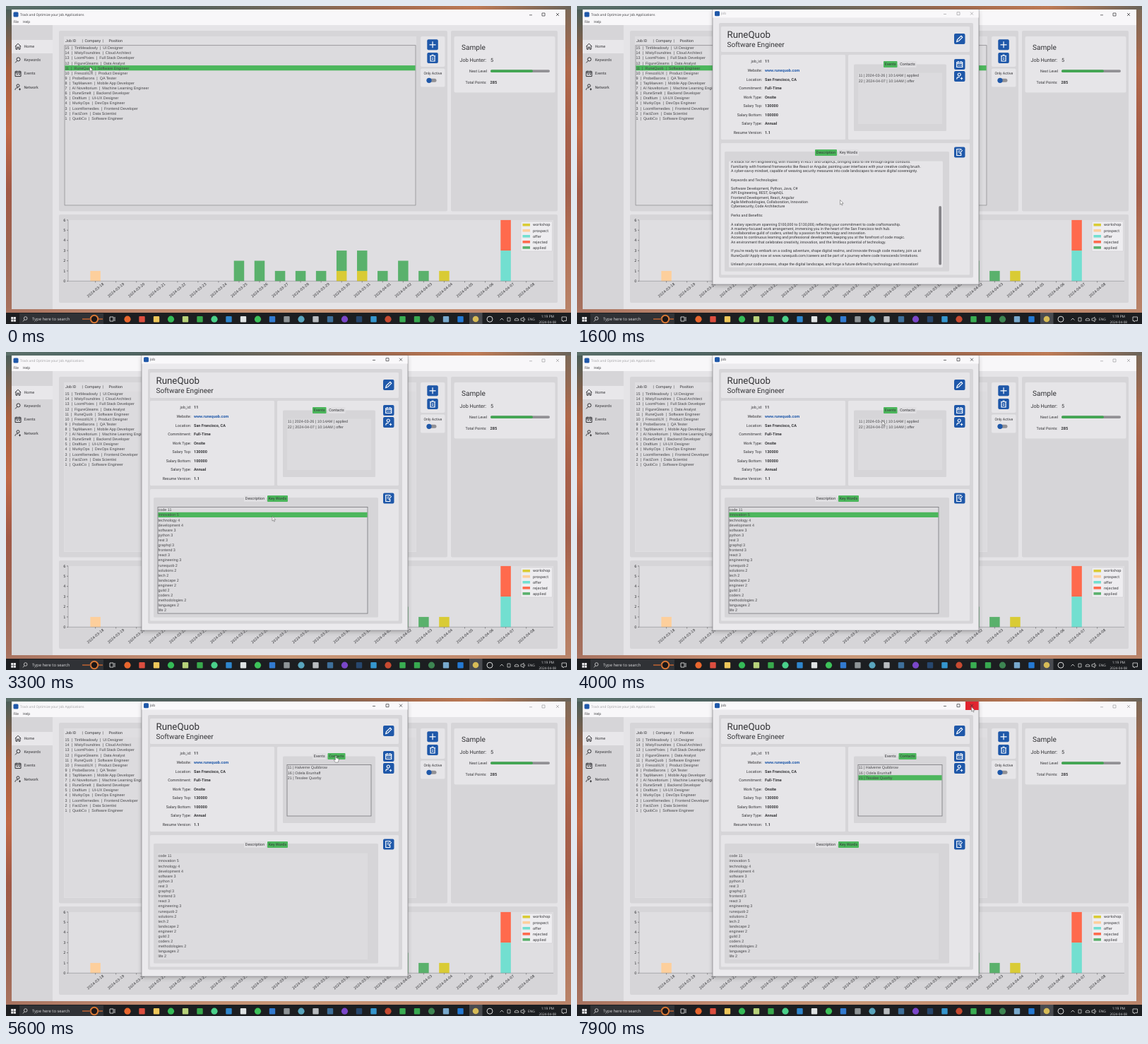
An HTML page for the animation above (8 s loop, 800 by 450 pixels).

```html
<!DOCTYPE html>
<html lang="en">
<head>
<meta charset="utf-8">
<title>Job tracker</title>
<style>
html, body { margin: 0; width: 100%; height: 100%; overflow: hidden; background: #222; }
svg { display: block; width: 800px; height: 450px; }
text { white-space: pre; text-rendering: geometricPrecision; }
.ui { font-family: Roboto, sans-serif; }
.list { font-family: "Liberation Sans", Arial, sans-serif; fill: #47474a; }
.sys { font-family: "Open Sans", sans-serif; }
.plot { font-family: "DejaVu Sans", sans-serif; }
.light { fill: #dcdcde; }
</style>
</head>
<body>
<svg id="stage" viewBox="0 0 800 450" xmlns="http://www.w3.org/2000/svg"></svg>
<script>
const BASE = '#e5e4e7', PANEL = '#d6d5d8', LIST = '#dcdbde', CARD = '#e6e5e8';
const GREEN = '#4cb65c', BLUE = '#1f58a9', INK = '#333336', ROW = 7.11;
const LOOP = 8000, STEP = 100, SCROLL = 111.3;

const rect = (x, y, w, h, fill, extra = '') =>
  `<rect x="${x}" y="${y}" width="${w}" height="${h}" fill="${fill}" ${extra}/>`;
const path = (d, stroke = INK, width = 0.7, extra = '') =>
  `<path d="${d}" fill="none" stroke="${stroke}" stroke-width="${width}" ${extra}/>`;
const circle = (x, y, r, fill, extra = '') =>
  `<circle cx="${x}" cy="${y}" r="${r}" fill="${fill}" ${extra}/>`;
// y is the vertical middle of the text
const text = (x, y, str, size = 5.4, cls = 'ui', extra = '') =>
  `<text x="${x}" y="${y + size * 0.35}" font-size="${size}" class="${cls}" fill="${INK}" ${extra}>${str}</text>`;
const END = 'text-anchor="end"', MID = 'text-anchor="middle"', BOLD = 'font-weight="700"';
const rows = (x, y, lines) => lines.map((s, i) => text(x, y + i * ROW, s, 5.4, 'list')).join('');
const group = (id, body, extra = '') => `<g id="${id}" ${extra}>${body}</g>`;

const jobs = [
  'TintMeadowly|UI Designer', 'MistyFoundries|Cloud Architect', 'LoomPixies|Full Stack Developer',
  'FigureGleams|Data Analyst', 'RuneQuob|Software Engineer', 'FrescoliUX|Product Designer',
  'ProbeBarons|QA Tester', 'TapMaeven|Mobile App Developer', 'AI Noveltorium|Machine Learning Engineer',
  'RuneSmelt|Backend Developer', 'Draftlum|UI-UX Designer', 'MurkyOps|DevOps Engineer',
  'LoomRemedies|Frontend Developer', 'FactZorn|Data Scientist', 'QuobCo|Software Engineer'
].map((job, i) => `${15 - i}|${job}`.replace(/\|/g, '  |  '));

const keywords = ('code 11,innovation 5,technology 4,development 4,software 3,python 3,rest 3,graphql 3,' +
  'frontend 3,react 3,engineering 3,runequob 2,solutions 2,tech 2,landscape 2,engineer 2,guild 2,' +
  'coders 2,methodologies 2,languages 2,life 2').split(',');
const events = ['11 | 2024-03-26 | 10:14AM | applied', '22 | 2024-04-07 | 10:14AM | offer'];
const contacts = ['11 | Halverne Quibbrow', '16 | Odela Brunhaff', '21 | Tesslee Quorby'];

const description = `About Us:
At RuneQuob, we forge digital solutions that empower businesses and individuals to thrive in the ever-evolving tech
landscape. We're searching for a skilled Software Engineer to join our guild of coders, where innovation, code, and
technology intertwine.

Responsibilities:

Collaborate with a consortium of developers to design, develop, and deploy software solutions using agile methodologies.
Code in languages like Python, Java, or C#, utilizing your skills to breathe life into intricate digital structures.
Engineer robust APIs and backend systems, weaving data into seamless interactions through REST and GraphQL.
Dive into frontend development, creating responsive user interfaces with technologies such as React or Angular.
Incorporate security measures into code structures, fortifying digital fortresses against cyber threats.

Qualifications:

A degree in Computer Science, Engineering, or a related field, bolstering your foundation in the realms of code.
Proficiency in languages like Python, Java, C#, and the ability to orchestrate code symphonies that resonate.
A knack for API engineering, with mastery in REST and GraphQL, bringing data to life through digital conduits.
Familiarity with frontend frameworks like React or Angular, painting user interfaces with your creative coding brush.
A cyber-savvy mindset, capable of weaving security measures into code landscapes to ensure digital sovereignty.

Keywords and Technologies:

Software Development, Python, Java, C#
API Engineering, REST, GraphQL
Frontend Development, React, Angular
Agile Methodologies, Collaboration, Innovation
Cybersecurity, Code Architecture

Perks and Benefits:

A salary spectrum spanning $100,000 to $130,000, reflecting your commitment to code craftsmanship.
A mastery-focused work arrangement, immersing you in the heart of the San Francisco tech hub.
A collaborative guild of coders, united by a passion for technology and innovation.
Access to continuous learning and professional development, keeping you at the forefront of code magic.
An environment that celebrates creativity, innovation, and the limitless potential of technology.

If you're ready to embark on a coding adventure, shape digital realms, and innovate through code mastery, join us at
RuneQuob! Apply now at www.runequob.com/careers and be part of a journey where code transcends limitations.

Unleash your code prowess, shape the digital landscape, and forge a future defined by technology and innovation!`.split('\n');

const gradient = (id, dir, stops) => `<linearGradient id="${id}" ${dir}>${
  stops.map((c, i) => `<stop offset="${i / (stops.length - 1)}" stop-color="${c}"/>`).join('')}</linearGradient>`;

function wallpaper() {
  const down = 'x1="0" y1="0" x2="0" y2="1"';
  return `<defs>
    ${gradient('top', '', ['#5b6f69', '#4d6664', '#55625d', '#75695a', '#a2694d', '#bd7a55', '#6a645a'])}
    ${gradient('left', down, ['#4a5d58', '#a9603f', '#c06a48', '#a05a48', '#9c6552', '#a87360'])}
    ${gradient('right', down, ['#7d6a58', '#b0684a', '#a85f49', '#a4604c', '#b57558', '#b9846a'])}
    ${gradient('bottom', '', ['#a87360', '#c08a70', '#c99878', '#c48d70', '#b9846a'])}
    <clipPath id="descClip"><rect x="215" y="219.5" width="297" height="150"/></clipPath>
    <filter id="shadow" x="-10%" y="-10%" width="120%" height="120%"><feGaussianBlur stdDeviation="3"/></filter>
  </defs>` + rect(0, 0, 800, 6, 'url(#top)') + rect(0, 5, 9, 430, 'url(#left)') +
    rect(791, 5, 9, 430, 'url(#right)') + rect(0, 428, 800, 7, 'url(#bottom)');
}

// Minimise, maximise and close marks
const controls = (xs, y) => path(`M${xs[0] - 2} ${y + .8}h4`) + path(`M${xs[1] - 2} ${y - 2}h4v4h-4z`) +
  path(`M${xs[2] - 2} ${y - 2}l4 4m0-4l-4 4`);

const button = (x, y, glyph) => rect(x, y, 15.5, 15, BLUE, 'rx="2"') +
  `<g transform="translate(${x + 7.75} ${y + 7.5})">${path(glyph, '#fff', 1.2)}</g>`;

function sidebar() {
  const glyphs = ['M-4 0L0-4L4 0M-3-1V4H-1V1H1V4H3V-1', 'M-1 1L-4 4M3-1A2.4 2.4 0 1 1-2-1A2.4 2.4 0 1 1 3-1',
    'M-4-3H4V4H-4ZM-4-1H4M-2-4V-2M2-4V-2M-2 1H0M1 1H3', 'M2-2A2 2 0 1 1-2-2A2 2 0 1 1 2-2M-4 4C-4 1-2 1 0 1M1 3H4M2.5 1.5V4.5'];
  return rect(8, 27, 58, 402, PANEL) + rect(8, 48, 58, 19, '#e8e7ea') +
    ['Home', 'Keywords', 'Events', 'Network'].map((name, i) => {
      const y = 57.2 + i * 19.2;
      return `<g transform="translate(17 ${y})">${path(glyphs[i], INK, 1)}</g>` + text(25.5, y, name);
    }).join('');
}

function chart() {
  const unit = 14.4, floor = 389.3, colors = { w: '#d9cb35', p: '#fdcf9c', o: '#72dfd0', r: '#ff6a4d', a: '#5ab16c' };
  const bars = { 0: 'p', 7: 'aa', 8: 'aa', 9: 'a', 10: 'a', 11: 'a', 12: 'waa', 13: 'waa', 14: 'a', 15: 'aa', 16: 'a', 17: 'w', 20: 'ooorrr' };
  let out = rect(75, 295, 706, 125, PANEL, 'rx="2"') + rect(88, 303, 687, 86.3, '#dfdee1');
  for (let v = 0; v <= 6; v++) {
    const y = floor - v * unit;
    out += text(84.5, y, v, 5, 'plot', END) + path(`M86 ${y}h2`, INK, .5);
  }
  for (let i = 0; i < 22; i++) {
    const x = 126.6 + i * 29.05;
    const date = i < 14 ? `2024-03-${18 + i}` : `2024-04-0${i - 13}`;
    const units = bars[i] || '';
    [...new Set(units)].forEach(kind => {
      const count = units.split(kind).length - 1;
      out += rect(x - 7.25, floor - (units.indexOf(kind) + count) * unit, 14.5, count * unit, colors[kind]);
    });
    out += path(`M${x} ${floor}v2`, INK, .5) +
      text(0, 0, date, 5, 'plot', `${MID} transform="translate(${x} 402) rotate(-40)"`);
  }
  out += path('M88 303V389.3H775', '#77767a', .5) +
    rect(729, 305, 44.5, 42, '#eeedf0', 'rx="1" stroke="#c8c7ca" stroke-width=".5"');
  ['workshop', 'prospect', 'offer', 'rejected', 'applied'].forEach((name, i) => {
    const y = 309.7 + i * 8.05;
    out += rect(731.5, y - 1.8, 10.5, 3.6, colors[name[0]]) + text(746, y, name, 5.1, 'plot');
  });
  return out;
}

function mainWindow() {
  return rect(8, 5, 784, 424, BASE) + rect(8, 5, 784, 22, '#f8f7f9') + rect(10.5, 8.5, 7, 7, BLUE, 'rx="1.5"') +
    group('mainTitle', text(20, 12, 'Track and Optimize your Job Applications', 4.75, 'sys') + controls([743, 761, 781], 12)) +
    text(10.5, 22.3, 'File', 4.75, 'sys') + text(24, 22.3, 'Help', 4.75, 'sys') + sidebar() +
    rect(75, 35, 550, 255.5, PANEL, 'rx="2"') + rect(82, 43, 499, 240, '#dfdee1') +
    [[84, 'Job ID'], [107.5, '|'], [111.5, 'Company'], [136.5, '|'], [145.5, 'Position']]
      .map(([x, s]) => text(x, 49, s, 5.35)).join('') +
    rect(83, 55.7, 497, 226.3, LIST) + rect(83, 55.7, 497, 226.3, 'none', 'id="jobsBorder" stroke="#8a898d" stroke-width=".8"') +
    rect(83.4, 84.1, 496.2, 7.2, GREEN, 'id="jobPick"') + rows(83.5, 59.3, jobs) +
    rect(587, 43, 34.5, 43, CARD, 'rx="2"') + button(596.3, 47.3, 'M0-4.5V4.5M-4.5 0H4.5') +
    button(596.3, 66, 'M-3-3H3V4.5H-3ZM-4-3H4M-1.5-4.5H1.5M-1 0H1M-1 2H1') +
    rect(587, 88.5, 34.5, 26, CARD, 'rx="2"') + text(604.3, 95, 'Only Active', 5.2, 'ui', MID) +
    rect(596, 102.8, 13.5, 5, '#929195', 'rx="2.5"') + circle(599, 105.3, 3.6, BLUE) +
    rect(630, 35, 151, 255.5, PANEL, 'rx="2"') + rect(634.5, 43, 143, 79.5, CARD, 'rx="2"') +
    text(645, 58.3, 'Sample', 10.1) + text(642.5, 76, 'Job Hunter:', 7.25) + text(686, 76, '5', 7.25) +
    text(681, 92, 'Next Level', 5.4, 'ui', END) + rect(686, 90.2, 84, 3.8, '#929195', 'rx="1.9"') +
    rect(686, 90.2, 60, 3.8, '#43a653', 'rx="1.9"') + text(680.5, 107.7, 'Total Points:', 5.4, 'ui', END) +
    text(685.5, 107.7, '285', 5.6, 'ui', BOLD) + chart();
}

function taskbar() {
  let out = rect(0, 434, 800, 16, '#1c1e21') + rect(19, 435, 119, 15, '#303236');
  for (const [x, y] of [[8, 440], [11.6, 440], [8, 443.6], [11.6, 443.6]]) out += rect(x - .8, y, 3.1, 3.1, '#e8e8ea');
  out += path('M30 442a2.3 2.3 0 1 1-4.6 0a2.3 2.3 0 1 1 4.6 0M26 444l-2 2.4', '#ddd', .8) +
    text(37, 443.3, 'Type here to search', 5.85, 'sys light') +
    circle(125, 443, 5.2, '#1d1717', 'stroke="#d87735" stroke-width="2"') + rect(108, 442, 12, 2, '#9a5632') +
    rect(131, 442, 6, 2, '#9a5632') + path('M147 440h5v6h-5zM154 440v6', '#ddd', .9);
  const icons = ['#e8662e', '#dc4e3f', '#edc65a', '#35bb57', '#b7d27a', '#38a94c', '#4ad08a', '#2f86cd', '#dfe3e4',
    '#3dc25a', '#327ad0', '#8e9497', '#59a5bd', '#b8bcc0', '#3e6f9a', '#7a47c9', '#27476e', '#3596ce', '#c74a31',
    '#39ad52', '#37a950', '#3d8552', '#78a9cd', '#2579d3'];
  icons.forEach((c, i) => {
    const x = 172 + i * 20.5;
    out += i % 3 ? rect(x - 4.2, 439, 8.4, 8.4, c, 'rx="1"') : circle(x, 443.2, 4.6, c);
  });
  return out + rect(656, 434, 18.5, 16, '#494b50') + circle(665, 443, 4.3, '#d6bb57') +
    circle(685, 443.2, 4, 'none', 'stroke="#ddd" stroke-width="1"') + path('M699.5 444.5l2.5-2.5l2.5 2.5', '#ddd', .8) +
    path('M710 441h4v5h-4zM720 445q0-3 3-3q3 0 3 3zM729 442h2l2-2v7l-2-2h-2zM734 442q1.5 1.5 0 3', '#ccc', .8) +
    text(739, 443.3, 'ENG', 4.8, 'sys light') +
    text(776, 439.7, '1:19 PM', 4.9, 'sys light', END) +
    text(779, 447, '2024-04-08', 4.7, 'sys light', END) +
    path('M787 440h6.5v5.5h-3l-1.5 1.5v-1.5h-2z', '#ddd', .8);
}

const tabs = [
  { id: 'events', label: 'Events', x: 434, y: 78, w: 19.5 }, { id: 'contacts', label: 'Contacts', x: 455.5, y: 78, w: 25 },
  { id: 'desc', label: 'Description', x: 337, y: 203, w: 31 }, { id: 'keys', label: 'Key Words', x: 370, y: 203, w: 29 }
];

function popup() {
  const details = [['job_id', '11'], ['Website', 'www.runequob.com'], ['Location', 'San Francisco, CA'],
    ['Commitment', 'Full-Time'], ['Work Type', 'Onsite'], ['Salary Top', '130000'], ['Salary Bottom', '100000'],
    ['Salary Type', 'Annual'], ['Resume Version', '1.1']];
  const cards = [[204, 29, 352, 36], [204, 69, 176, 120], [384, 69, 172, 120], [204, 194, 352, 186.5]];
  const person = 'M1.5-2.5A2 2 0 1 1-2.5-2.5A2 2 0 1 1 1.5-2.5M-4 4C-4 1-2 1 0 1M1 3H4.5M2.8 1.2V4.8';
  const body = rect(201, 24, 360, 360.5, PANEL, 'rx="2"') + cards.map(c => rect(...c, CARD, 'rx="1.5"')).join('') +
    text(212.5, 40.5, 'RuneQuob', 13.3) + text(212.5, 54.7, 'Software Engineer', 10) +
    details.map(([key, value], i) => text(262, 78.5 + i * 12.56, key + ':', 5.4, 'ui', END) +
      text(266, 78.5 + i * 12.56, value, 5.5, 'ui', BOLD + (i === 1 ? ` style="fill:${BLUE}"` : ''))).join('') +
    button(534, 39, 'M-4 4L-3.2 1L2.2-4.2L4-2.2L-1.2 3Z') +
    button(534, 75, 'M-4-3H4V4H-4ZM-4-1H4M-2-4.5V-2M2-4.5V-2M-2 1.5H0M1 1.5H3') +
    button(534, 92, person) + button(534, 199.5, 'M2 1V4.5H-4V-4.5H2V-3M-2-2H1M-2 0H0M0 2L4-3') +
    rect(392, 82.5, 131, 94.5, PANEL, 'rx="1.5"') + rect(398, 94.5, 119, 72.5, LIST) +
    rect(398, 94.5, 119, 72.5, 'none', 'id="sideBorder" stroke="#77767a" stroke-width=".8"') +
    rect(398.4, 95, 118.2, 7.2, GREEN, 'id="sidePick"') +
    group('eventRows', rows(398.8, 98.6, events)) + group('contactRows', rows(398.8, 98.6, contacts)) +
    rect(209, 206, 318, 169.5, PANEL, 'rx="1.5"') +
    group('descView', rect(215, 219.5, 303, 150.5, CARD, 'rx="1.5"') +
      `<g clip-path="url(#descClip)">${group('descText', description.map((s, i) => text(218, 225 + i * 6.29, s, 5.29)).join(''))}</g>` +
      rect(512.3, 223, 3.7, 83.5, '#858488', 'id="thumb" rx="1.8"')) +
    group('keyView', rect(215, 219.5, 297, 150.5, LIST) +
      rect(215, 219.5, 297, 150.5, 'none', 'id="keyBorder" stroke="#77767a" stroke-width=".8"') +
      rect(215.4, 226.8, 296.2, 7.2, GREEN, 'id="keyPick"') + rows(215.6, 223.4, keywords)) +
    tabs.map(t => rect(t.x, t.y, t.w, 9, CARD, `id="tab-${t.id}" rx="1"`) +
      text(t.x + t.w / 2, t.y + 4.6, t.label, 5.4, 'ui', MID)).join('');
  return rect(192, 7, 377, 389, '#000', 'opacity=".22" filter="url(#shadow)"') +
    rect(192, 5, 377, 389, '#ebeaed', 'stroke="#77767a" stroke-width=".6"') + rect(192.3, 5, 376.4, 11.5, '#f9f8fa') +
    rect(195, 7.3, 7, 7, BLUE, 'rx="1.5"') + rect(550, 5, 18.7, 12, '#e1242f', 'id="closeHover"') +
    group('popTitle', text(204, 10.8, 'Job', 4.75, 'sys') + controls([521, 540, 559], 10.7)) + group('popBody', body);
}

const cursor = group('cursor',
  `<path id="arrow" d="M0 0V6.6L1.5 5.2L2.6 7.6L3.6 7.1L2.6 4.8H4.7Z" fill="#fff" stroke="#444" stroke-width=".45"/>
   <path id="hand" d="M-.7 .3Q0-.6 .7 .3V3L4 3.8V6.6L3.2 9H-.6L-3 5.7Q-2.4 4.6-.7 6Z" fill="#fff" stroke="#444" stroke-width=".45"/>`);

document.getElementById('stage').innerHTML = wallpaper() + mainWindow() + taskbar() + group('popup', popup()) + cursor;

const el = {};
document.querySelectorAll('#stage [id]').forEach(node => { el[node.id] = node; });
const show = (id, on) => { el[id].style.display = on ? '' : 'none'; };

// Pointer stops: [time, x, y]
const route = [[0, 118.5, 86], [400, 118.5, 86], [800, 372.5, 274.5], [2000, 372.5, 274.5], [2400, 381, 210],
  [2800, 381, 210], [3200, 377, 232.5], [3500, 377, 232.5], [4000, 432, 97], [4300, 432, 97], [4700, 301.5, 57],
  [4800, 301.5, 57], [5300, 467, 82], [5700, 467, 82], [6200, 456, 105], [6400, 456, 105], [6600, 458, 113],
  [7200, 458, 113], [7700, 558.5, 12.5], [8000, 558.5, 12.5]];
const scrollStops = [[0, 0], [900, 0], [1500, 1], [1700, 1], [2100, 0], [8000, 0]];

function along(stops, t, ease = k => k) {
  const i = Math.max(1, stops.findIndex(s => s[0] >= t));
  const [a, b] = [stops[i - 1], stops[i]];
  const k = ease((t - a[0]) / (b[0] - a[0]));
  return a.slice(1).map((v, j) => v + (b[j + 1] - v) * k);
}

function draw(t) {
  const [x, y] = along(route, t, k => k * k * (3 - 2 * k));
  const [scroll] = along(scrollStops, t);
  const focused = t >= 2700, keysOpen = t >= 2700, contactsOpen = t >= 5500;
  const keyPicked = t >= 3200 && t < 4100, eventPicked = t >= 4100;

  show('popup', t >= 200);
  show('popBody', t >= 300);
  el.mainTitle.setAttribute('opacity', focused ? .45 : 1);
  el.popTitle.setAttribute('opacity', focused ? 1 : .45);
  show('jobsBorder', !focused);
  show('jobPick', t < 3200);

  show('descView', !keysOpen);
  show('keyView', keysOpen);
  show('keyBorder', keyPicked);
  show('keyPick', keyPicked);
  el.descText.setAttribute('transform', `translate(0 ${-SCROLL * scroll})`);
  el.thumb.setAttribute('y', 223 + 60 * scroll);

  const row = !contactsOpen ? 0 : t < 6800 ? 1 : 2;
  show('eventRows', !contactsOpen);
  show('contactRows', contactsOpen);
  show('sideBorder', eventPicked);
  show('sidePick', contactsOpen ? t >= 6300 : eventPicked);
  el.sidePick.setAttribute('y', 95 + row * ROW);

  const selected = [contactsOpen ? 'contacts' : 'events', keysOpen ? 'keys' : 'desc'];
  let overTab = false;
  for (const tab of tabs) {
    const over = t >= 300 && x > tab.x && x < tab.x + tab.w && y > tab.y && y < tab.y + 9;
    overTab = overTab || over;
    el['tab-' + tab.id].setAttribute('fill', selected.includes(tab.id) ? GREEN : over ? '#aaa9ad' : '#e0dfe2');
  }
  show('closeHover', x > 550 && y < 17);
  show('arrow', !overTab);
  show('hand', overTab);
  el.cursor.setAttribute('transform', `translate(${x} ${y})`);
}

const start = performance.now();
function tick() {
  const t = (performance.now() - start) % LOOP;
  draw(Math.floor(t / STEP) * STEP);
  requestAnimationFrame(tick);
}
tick();
</script>
</body>
</html>
```
